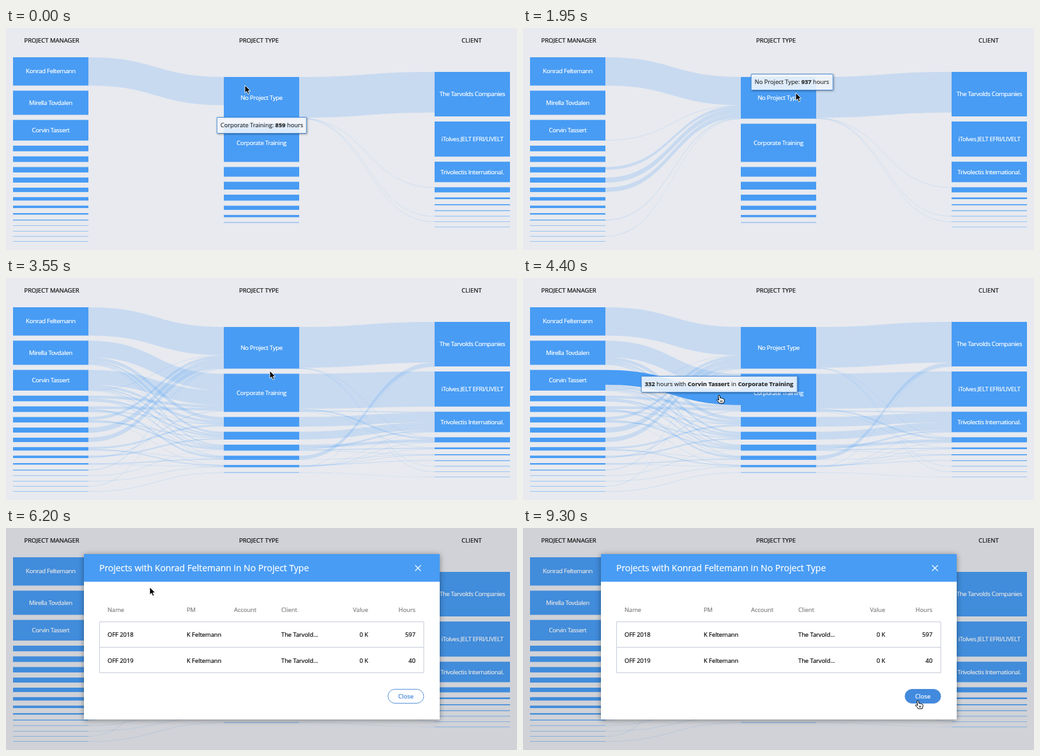
Animation of 800 by 349 pixels, one loop 9350 ms. Source, as an HTML page:

```html
<!DOCTYPE html>
<html lang="en">
<head>
<meta charset="utf-8">
<title>Project hours</title>
<style>
  html, body { margin: 0; width: 100%; height: 100%; overflow: hidden; background: #e8eaef; }
  #stage { position: relative; width: 800px; height: 349px; overflow: hidden; }
  #stage, svg text { font-family: "Open Sans", sans-serif; }
  svg { position: absolute; left: 0; top: 0; }
  svg text { stroke-width: .22px; }
  #tip {
    position: absolute; left: 0; top: 0; height: 24px; padding: 0 5px;
    border: 1px solid #4b8fd8; border-radius: 1px;
    background: rgba(243, 246, 251, .88); box-shadow: 1px 1px 3px rgba(0, 0, 0, .4);
    font-size: 9.3px; line-height: 23px; color: #222; white-space: nowrap;
    -webkit-text-stroke: .12px #222;
  }
</style>
</head>
<body>
<div id="stage">
  <svg id="chart" width="800" height="349"></svg>
  <div id="tip"></div>
  <svg id="front" width="800" height="349"></svg>
</div>
<script>
const LOOP = 9350, BLUE = '#489cf4', NODE_W = 118, GAP = 8;
const $ = id => document.getElementById(id);
const chart = $('chart'), front = $('front'), tip = $('tip');

function el(parent, tag, attrs) {
  const e = document.createElementNS('http://www.w3.org/2000/svg', tag);
  for (const k in attrs) e.setAttribute(k, attrs[k]);
  return parent.appendChild(e);
}
function text(parent, x, y, str, attrs) {
  const fill = attrs.fill || '#111';
  const e = el(parent, 'text', { x, y, 'font-size': 9.3, fill, stroke: fill, ...attrs });
  e.textContent = str;
  return e;
}

// A few tall nodes per column, then a shrinking tail.
// main: the strongest flows to the next column as [from, to, width]; no width means all that fits
const columns = [
  { x: 11, y: 46, title: 'PROJECT MANAGER', tx: 71.5,
    names: ['Konrad Feltemann', 'Mirella Tovdalen', 'Corvin Tassert'],
    tall: [44.5, 38, 32.5], count: 16, tail: i => 8.8 * Math.exp(-((i / 6.35) ** 3)),
    main: [[0, 0], [1, 1, 26], [2, 1, 23.3], [2, 0, .6], [6, 0], [7, 0], [11, 0], [14, 0], [5, 0], [15, 7]] },
  { x: 341, y: 77, title: 'PROJECT TYPE', tx: 396,
    names: ['No Project Type', 'Corporate Training'],
    tall: [65.5, 60], count: 8, tail: i => 15.2 - 2.9 * i,
    main: [[0, 0, 64], [0, 7], [0, 8], [1, 1], [2, 2], [3, 2], [5, 0], [6, 0], [7, 9]] },
  { x: 671, y: 69, title: 'CLIENT', tx: 729,
    names: ['The Tarvolds Companies', 'iTolves JELT EFRI/LIVELT', 'Trivolectis International.'],
    tall: [70, 55.2, 32.2, 8], count: 10, tail: i => 2.6 * .62 ** i }
];

for (const c of columns) {
  let y = c.y;
  c.nodes = Array.from({ length: c.count }, (_, i) => {
    const h = c.tall[i] ?? c.tail(i - c.tall.length);
    const n = { y, h, out: y, in: y };
    y += h + GAP;
    return n;
  });
}

// Main flows first; what is left goes in shrinking parts to the nodes with most room
function share(a, b, side) {
  const left = a.nodes.map(n => n.h), room = b.nodes.map(n => n.h), list = [];
  const add = (from, to, want = Infinity) => {
    const w = Math.min(want, left[from], room[to]);
    left[from] -= w;
    room[to] -= w;
    list.push({ side, from, to, w, mid: side ? from : to });
  };
  a.main.forEach(m => add(...m));
  left.forEach((_, from) => {
    const free = new Set(room.keys());
    list.forEach(l => l.from === from && free.delete(l.to));
    while (left[from] > .1 && free.size) {
      const to = [...free].reduce((p, q) => room[q] > room[p] ? q : p);
      free.delete(to);
      if (room[to] > .1) add(from, to, left[from] * .4 + .8);
    }
  });
  return list;
}

function layLinks(a, b, side) {
  const list = share(a, b, side);
  list.sort((p, q) => q.w - p.w).forEach(l => {
    l.y1 = a.nodes[l.from].out;
    a.nodes[l.from].out += l.w;
  });
  list.sort((p, q) => p.from - q.from).forEach(l => {
    l.y2 = b.nodes[l.to].in;
    b.nodes[l.to].in += l.w;
  });
  const x1 = a.x + NODE_W, x2 = b.x, xm = (x1 + x2) / 2;
  for (const l of list) {
    const { y1, y2 } = l, t = Math.max(l.w, .7);
    l.path = el(chart, 'path', {
      fill: BLUE,
      d: `M${x1} ${y1}C${xm} ${y1} ${xm} ${y2} ${x2} ${y2}v${t}` +
         `C${xm} ${y2 + t} ${xm} ${y1 + t} ${x1} ${y1 + t}z`
    });
  }
  return list;
}
const [managers, types, clients] = columns;
const links = [...layLinks(managers, types, 0), ...layLinks(types, clients, 1)];

for (const c of columns) {
  text(chart, c.tx, 22.5, c.title, { 'text-anchor': 'middle', 'font-size': 9.5 });
  c.nodes.forEach((n, i) => {
    el(chart, 'rect', { x: c.x, y: n.y, width: NODE_W, height: Math.max(n.h, .5), fill: BLUE });
    if (c.names[i]) {
      text(chart, c.x + NODE_W / 2, n.y + n.h / 2 + 3.2, c.names[i],
        { 'text-anchor': 'middle', 'font-size': 9.7, 'letter-spacing': -.35, fill: '#fff' });
    }
  });
}

// Dialog
const shade = el(front, 'rect', { width: 800, height: 349, fill: '#000' });
const modal = el(front, 'g', {});
el(modal, 'rect', { x: 122, y: 41, width: 557, height: 260, fill: '#fff',
  style: 'filter:drop-shadow(0 1px 4px rgba(0,0,0,.4))' });
el(modal, 'rect', { x: 122, y: 41, width: 557, height: 43.5, fill: BLUE });
text(modal, 146, 68, `Projects with ${managers.names[0]} in No Project Type`,
  { 'font-size': 13.95, fill: '#fff' });
el(modal, 'path', { d: 'M640.5 58.5l9 9m0-9l-9 9', stroke: '#fff', 'stroke-width': 1.1 });
el(modal, 'path', { d: 'M146.5 147.5h507.5v80h-507.5zM146.5 187.5h507.5',
  fill: 'none', stroke: '#c6ccd8' });
const cells = [159, 283, 357, 431, 567, 641];
function row(y, values, fill) {
  values.forEach((v, i) => text(modal, cells[i], y, v,
    { fill, 'text-anchor': i > 3 ? 'end' : 'start' }));
}
row(131.5, ['Name', 'PM', 'Account', 'Client', 'Value', 'Hours'], '#808080');
row(171.4, ['OFF 2018', 'K Feltemann', '', 'The Tarvold...', '0 K', '597']);
row(211.6, ['OFF 2019', 'K Feltemann', '', 'The Tarvold...', '0 K', '40']);
const button = el(modal, 'rect', { x: 598, y: 253.5, width: 56, height: 22, rx: 11,
  fill: '#418ade', stroke: '#5a93d8' });
const buttonText = text(modal, 626, 267.6, 'Close', { 'text-anchor': 'middle', 'font-size': 9.5 });

// Pointers, with the tip at 0,0
const arrow = el(front, 'path', {
  d: 'M0 0V12L2.8 9.5L4.8 14L6.9 13.1L5 8.8H8.8Z', fill: '#000', stroke: '#fff', 'stroke-width': .9
});
const hand = el(front, 'path', {
  d: 'M-1.3 1Q0-.8 1.2 1L2 5Q3.4 4 4.2 5.4Q5.6 4.8 6.2 6Q8 5.6 8.2 7.2Q8.4 10 7 13H.6' +
     'Q-.6 10.8-3.2 8.4Q-4 6.8-2.2 6.8L-.2 8.2ZM2.6 8.4v2.6M4.6 8.4v2.6',
  fill: '#fff', stroke: '#000', 'stroke-linejoin': 'round'
});

// Time, x, y
const route = [
  [0, 374, 90], [1950, 427, 102], [2500, 427, 102], [3550, 413, 146], [4400, 307, 184],
  [5050, 225, 93], [6800, 225, 93], [7500, 348, 170], [7700, 361, 192], [8650, 577, 257],
  [8900, 618, 271]
];
const clamp = v => Math.min(1, Math.max(0, v));
const ramp = (t, start, len) => clamp((t - start) / len);
const ease = u => (1 - Math.cos(Math.PI * u)) / 2;
const mix = (a, b, u) => a + (b - a) * u;
const current = (steps, t) => steps.findLastIndex(s => t >= s[0]);

function pointerAt(t) {
  const i = current(route, t), a = route[i], b = route[i + 1] || a;
  const u = b === a ? 0 : ease(ramp(t, a[0], b[0] - a[0]));
  return [mix(a[1], b[1], u), mix(a[2], b[2], u)];
}

// Which links are on view, by time
const views = [
  [0, l => l.mid === 0 && (l.side || !l.from)],
  [50, l => l.mid === 0],
  [3230, () => true],
  [3650, l => l.mid === 1],
  [4070, () => true]
];
// Tooltip text and the highlighted manager, by time
const hoursOf = (n, who, what) =>
  `<b>${n}</b> hours with <b>${managers.names[who]}</b> in <b>${types.names[what]}</b>`;
const trainingTip = 'Corporate Training: <b>859</b> hours';
const hovers = [
  [0, trainingTip],
  [50, 'No Project Type: <b>937</b> hours'],
  [3230, ''],
  [3650, trainingTip],
  [4100, hoursOf(332, 2, 1), 2],
  [4630, hoursOf(371, 1, 1), 1],
  [4850, hoursOf(637, 0, 0), 0],
  [5870, '']
];

let shown = null;
function drawTip(t, x, y, [, html, who]) {
  if (html !== shown) {
    tip.innerHTML = shown = html;
    tip.style.display = html ? 'block' : 'none';
  }
  // On load it slides over from the node below
  const u = ease(ramp(t, 0, 250));
  const cx = mix(400.5, who === undefined ? x - 6 : x, u);
  const bottom = mix(166, y - 4, u);
  tip.style.transform = `translate(${cx}px, ${bottom - 26}px) translateX(-50%)`;
}

const isBand = (l, who) => !l.side && l.from === who && l.mid === (who ? 1 : 0);

function drawLinks(t, h) {
  const v = current(views, t), fade = ramp(t, views[v][0], 250);
  const before = views[Math.max(0, v - 1)][1], now = views[v][1];
  const last = hovers[Math.max(0, h - 1)][2], dim = ramp(t, hovers[h][0], 300);
  for (const l of links) {
    const seen = .2 * mix(before(l) ? 1 : 0, now(l) ? 1 : 0, fade);
    const opacity = isBand(l, hovers[h][2]) ? 1 : isBand(l, last) ? mix(1, seen, dim) : seen;
    l.path.setAttribute('opacity', opacity);
  }
}

function drawModal(t) {
  const open = ease(ramp(t, 5900, 300)), press = ramp(t, 8750, 200);
  shade.setAttribute('opacity', .1 * open);
  modal.setAttribute('opacity', open);
  button.setAttribute('fill-opacity', press);
  for (const k of ['fill', 'stroke']) buttonText.setAttribute(k, press > .5 ? '#fff' : '#3f83d6');
}

function drawPointer(t, x, y) {
  const onRow = y > 148 && y < 228, onButton = x > 598 && y > 253;
  const isHand = t < 6000 ? t >= 4100 : onRow || onButton;
  arrow.setAttribute('visibility', isHand ? 'hidden' : 'visible');
  hand.setAttribute('visibility', isHand ? 'visible' : 'hidden');
  (isHand ? hand : arrow).setAttribute('transform', `translate(${x} ${y})`);
}

function render(t) {
  const [x, y] = pointerAt(t), h = current(hovers, t);
  drawTip(t, x, y, hovers[h]);
  drawLinks(t, h);
  drawModal(t);
  drawPointer(t, x, y);
}

const start = performance.now();
function tick() {
  render((performance.now() - start) % LOOP);
  requestAnimationFrame(tick);
}
tick();
</script>
</body>
</html>
```
